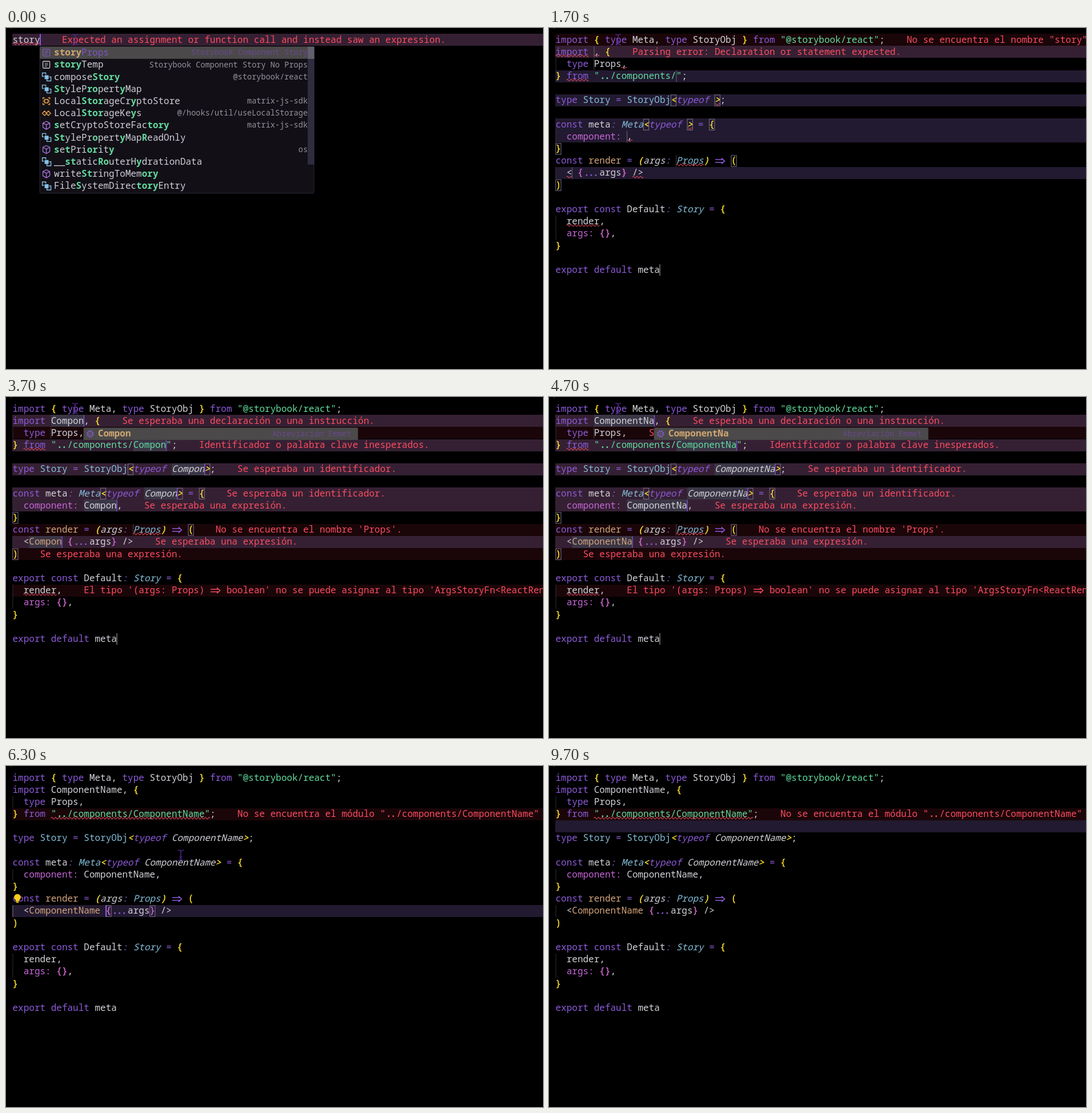
Write an HTML page that moves like this. It is 940x596 px and loops after 9.8 s.

```html
<!DOCTYPE html>
<html lang="es">
<head>
<meta charset="utf-8">
<title>Editor</title>
<style>
html, body { margin: 0; width: 100%; height: 100%; overflow: hidden; background: #000; }
svg { display: block; width: 940px; height: 596px; }
text { font-family: "Noto Sans Mono", "DejaVu Sans Mono", monospace; white-space: pre; }
</style>
</head>
<body>
<svg id="stage" viewBox="0 0 940 596"></svg>
<script>
const LOOP = 9800, CW = 9.6, LH = 21.18, FS = 16;
const X = c => 11.5 + c * CW;
const Y = l => 10 + l * LH;
const INK = { k: '#8d5bda', w: '#d3d2d9', g: '#ffe02e', s: '#62dd9f', c: '#83bcd8',
  o: '#d3a47c', p: '#c666d8', h: '#d468d2', r: '#fc4c60' };
const FULL = 'ComponentName';
const T = { insert: 1200, lint: 1500, check: 2100, close: 5200, clean: 5400, click: 5900,
  pick: 7700, bulb: 8200, leave: 8900, gone: 9400 };
const MOUSE = [[0, 121, 20], [5400, 121, 20], [5900, 172, 252], [6300, 306, 156],
  [7100, 306, 156], [7600, 243, 226], [8400, 243, 226], [8900, 400, 106], [9800, 400, 106]];

const esc = s => s.replace(/&/g, '&amp;').replace(/</g, '&lt;').replace(/>/g, '&gt;');
const rect = (x, y, w, h, fill, more = '') =>
  `<rect x="${x}" y="${y}" width="${w}" height="${h}" fill="${fill}" ${more}/>`;
const path = (d, stroke, w = 1.3, fill = 'none') =>
  `<path d="${d}" stroke="${stroke}" stroke-width="${w}" fill="${fill}"/>`;
const label = (x, y, s, fill, more = '', size = FS) =>
  `<text x="${x.toFixed(2)}" y="${y.toFixed(2)}" font-size="${size}" fill="${fill}" ${more}>${esc(s)}</text>`;

function arrow(x, y, ink) {
  return path(`M${x + 1} ${y - 2.3}h14M${x + 1} ${y + 2.3}h14M${x + 12} ${y - 5}l5.5 5l-5.5 5`, ink, 1.5);
}

// Joined dots sit closer together than the grid
function dots(x, y, n, ink) {
  const mid = x + n * CW / 2;
  let out = '';
  for (let i = 0; i < n; i++) out += `<circle cx="${mid + (i - (n - 1) / 2) * 8}" cy="${y}" r="1.4" fill="${ink}"/>`;
  return out;
}

// Writes text on the character grid with its ligatures
function write(line, col, s, ink, more) {
  let out = '';
  for (const part of s.split(/(=>|\.{2,3})/)) {
    if (part === '=>') out += arrow(X(col), Y(line) + 10.6, ink);
    else if (part.startsWith('..')) out += dots(X(col), Y(line) + 14.2, part.length, ink);
    else if (part.trim()) out += label(X(col), Y(line) + 15.5, part, ink, more);
    col += part.length;
  }
  return out;
}

// Colour key and text alternate; a capital key means italic
function source(n) {
  return [
    'k|import |g|{ |k|type |w|Meta, |k|type |w|StoryObj |g|} |k|from |s|"@storybook/react"|w|;',
    `k|import |w|${n}, |g|{`,
    'k|  type |w|Props,',
    `g|} |k|from |s|"../components/${n}"|w|;`,
    '',
    `k|type |c|Story |k|= |c|StoryObj|G|<|K|typeof |W|${n}|G|>|w|;`,
    '',
    `k|const |w|meta|K|: |C|Meta|G|<|K|typeof |W|${n}|G|> |k|= |g|{`,
    `p|  component: |w|${n},`,
    'g|}',
    'k|const |o|render |k|= |G|(|W|args|K|: |C|Props|G|) |k|=> |g|(',
    `w|  <|o|${n}|h| {|k|...|w|args|h|}|w| />`,
    'g|)',
    '',
    'k|export const |w|Default|K|: |C|Story |k|= |g|{',
    'w|  render,',
    'p|  args: |h|{}|w|,',
    'g|}',
    '',
    'k|export default |w|meta'
  ].map(l => l ? l.split('|') : []);
}
const width = toks => toks.reduce((sum, s, i) => sum + (i % 2 ? s.length : 0), 0);

function codeLine(toks, line) {
  let col = 0, out = '';
  for (let i = 0; i < toks.length; i += 2) {
    const key = toks[i], low = key.toLowerCase(), ink = INK[low];
    const slant = key === low ? '' : 'font-style="italic"';
    const heavy = 'gh'.includes(low) ? ` stroke="${ink}" stroke-width=".4"` : '';
    out += write(line, col, toks[i + 1], ink, slant + heavy);
    col += toks[i + 1].length;
  }
  return out;
}

function squiggle(line, col, n) {
  const x = X(col), steps = Math.round(n * CW / 3.2);
  let d = `M${x} ${Y(line) + 17.6}`;
  for (let i = 0; i < steps; i++) d += `q1.6 ${i % 2 ? 3 : -3} 3.2 0`;
  return path(d, '#d9485a', 1.1);
}
const band = (line, fill) => rect(11, Math.round(Y(line)), 929, 21, fill);
const mark = (line, col, n, fill) => rect(X(col), Math.round(Y(line)), n * CW, 21, fill);
const caret = (line, col, fill, w = 1.5) => rect(X(col) - .5, Y(line) + .5, w, LH - 1, fill);
const frame = (line, col) => rect(X(col) + .3, Y(line) + 1, CW - .4, LH - 2, 'none',
  'stroke="#77708a" stroke-width="1"');

function bulb(x, y) {
  return `<circle cx="${x}" cy="${y - 2}" r="5.8" fill="#ffcc1c"/>` +
    rect(x - 2.8, y + 2, 5.6, 3.2, '#ffcc1c') + rect(x - 2.3, y + 5.8, 4.6, 1.7, '#ffcc1c');
}

const ICON = {
  s: (x, y, ink) => rect(x - 6, y - 6, 12, 12, 'none', `rx="1.5" stroke="${ink}" stroke-width="1.3"`) +
    path(`M${x - 3} ${y - 2.5}h6M${x - 3} ${y + .3}h6M${x - 3} ${y + 3}h4`, ink, 1.1),
  v: (x, y) => rect(x - 3, y - 3, 7, 7, '#86bfe6', 'rx="1"') +
    path(`M${x - 4} ${y - 1}h-3v-6h6v3M${x + 5} ${y}h3v7h-7v-3`, '#86bfe6', 1.4),
  c: (x, y) => rect(x - 3, y - 3, 6, 6, 'none', 'stroke="#e09a48" stroke-width="1.6"') +
    path(`M${x - 6} ${y - 3}v-3h3M${x + 3} ${y - 6}h3v3M${x + 6} ${y + 3}v3h-3M${x - 3} ${y + 6}h-3v-3M${x - 6} ${y}h3M${x + 3} ${y}h3`, '#e09a48', 1.4),
  e: (x, y) => path(`M${x - 7} ${y}l4 -4l3.5 4l-3.5 4zM${x} ${y}l3.5 -4l4 4l-4 4z`, '#e09a48', 1.5),
  m: (x, y) => path(`M${x} ${y - 7}l6 3v7.5l-6 3.5l-6 -3.5v-7.5zM${x - 6} ${y - 4}l6 3l6 -3M${x} ${y - 1}v8`, '#a874dc'),
  g: (x, y, ink) => `<circle cx="${x}" cy="${y}" r="5.2" fill="none" stroke="${ink}" stroke-width="2.6" stroke-dasharray="2.3 1.78"/>` +
    `<circle cx="${x}" cy="${y}" r="3.9" fill="none" stroke="${ink}" stroke-width="1.2"/><circle cx="${x}" cy="${y}" r="1.3" fill="${ink}"/>`
};

// Items are "icon name|detail"; brackets hold the matched letters
const STORY = ['s [story]Props|Storybook Component Story', 's [story]Temp|Storybook Component Story No Props',
  'v compose[Story]|@storybook/react', 'v [St]yleP[ro]pert[y]Map', 'c Local[Stor]ageCr[y]ptoStore|matrix-js-sdk',
  'e Local[Stor]ageKe[y]s|@/hooks/util/useLocalStorage', 'm [s]etCryptoStoreFac[tory]|matrix-js-sdk',
  'v [St]ylePr[o]pert[y]Map[R]eadOnly', 'm [s]e[t]Pri[or]it[y]|os', 'v __[st]atic[Ro]uterH[y]drationData',
  'm write[St]ringToMem[ory]', 'v File[S]ystemDirec[tory]Entry'];
const WORDS = ['g Code', 'g Col', 'g Colg', 'g Colgroup', 'g Command', 's comp|React Functional Component',
  's compProps|React Functional Component with Props', 's con|constructor', 's useContextSnippet|useContext',
  's [cco]|consoleCount', 's [cco]|consoleCount'];

function matches(q) {
  const re = new RegExp(q, 'i');
  const rest = WORDS.filter(w => re.test(w.slice(2).split('|')[0]))
    .map(w => w.includes('[') ? w : w.slice(0, 2) + w.slice(2).replace(re, '[$&]'));
  return [`g [${q}]|Abreviación Emmet`, ...rest];
}

function popup(col, line, items) {
  const x = X(col) - .4, y = Y(line + 1) + 1.5, h = items.length * LH + (items.length > 1 ? 2 : 0);
  let out = rect(x, y, 480, h, '#121016', 'rx="2" stroke="#2d2936" stroke-width="1"') +
    rect(x, y, 480, LH, '#4b4949');
  if (items.length > 11) out += rect(x + 469, y, 11.5, 206, '#302c40') + rect(x + 469, y, 11.5, LH, '#625f6c');
  items.forEach((item, i) => {
    const cy = y + 10.4 + i * LH, [name, detail] = item.slice(2).split('|');
    out += ICON[item[0]](x + 11.5, cy, i ? '#c9c7d0' : '#7d58b8');
    let tx = x + 25;
    name.split(/[\[\]]/).forEach((s, j) => {
      const hit = j % 2;
      if (s) out += label(tx, cy + 5.2, s, hit ? (i ? '#62d9a0' : '#cfa672') : (i ? '#cfcdd6' : '#7d55c4'),
        hit ? 'font-weight="700"' : '');
      tx += s.length * CW;
    });
    if (detail) out += label(x + 469, cy + 4.3, detail, i ? '#94929b' : '#68498f', 'text-anchor="end"', 13.6);
  });
  return out;
}

// Letters typed so far
const typed = t => t < 2464 ? 0 : Math.min(FULL.length, 1 + Math.floor((t - 2464) / 208));

function problems(t) {
  if (t < T.lint) return { 0: 'No se encuentra el nombre "story".' };
  if (t < T.check) return { 0: 'No se encuentra el nombre "story".', 1: 'Parsing error: Declaration or statement expected.' };
  if (t >= T.clean) return { 3: `No se encuentra el módulo "../components/${FULL}"` };
  const decl = 'Se esperaba una declaración o una instrucción.', expr = 'Se esperaba una expresión.',
    id = 'Se esperaba un identificador.';
  return { 1: decl, 2: decl, 3: 'Identificador o palabra clave inesperados.', 5: id, 7: id, 8: expr,
    10: "No se encuentra el nombre 'Props'.", 11: expr, 12: expr,
    15: "El tipo '(args: Props) => boolean' no se puede asignar al tipo 'ArgsStoryFn<ReactRenderer, Props>'." };
}

function underlines(t, n) {
  if (t < T.lint) return [];
  if (t >= T.clean) return [[3, 7, 29]];
  const list = [[3, 2, 4], [10, 22, 5], [15, 2, 6]];
  if (n < 6) list.push([1, 0, 6], [1, 7 + n, 1], [11, 2, 1]);
  if (!n) list.push([2, 12, 1], [5, 29, 1], [7, 24, 1], [8, 13, 1], [11, 14, 2]);
  return list;
}

function pointer(t) {
  if (t >= T.gone) return '';
  const i = MOUSE.findIndex(m => m[0] > t), [t0, x0, y0] = MOUSE[i - 1], [t1, x1, y1] = MOUSE[i];
  const u = (t - t0) / (t1 - t0), e = u * u * (3 - 2 * u);
  const x = x0 + (x1 - x0) * e, y = y0 + (y1 - y0) * e;
  return path(`M${x - 5} ${y - 9}q5 0 5 3q0 -3 5 -3M${x} ${y - 7}v14M${x - 5} ${y + 9}q5 0 5 -3q0 3 5 3M${x - 2.5} ${y + 3}h5`, '#4c2384', 1.7);
}

const blink = (t, from) => Math.floor((t - from) / 500) % 2 === 0;

function opening(t) {
  return band(0, '#352033') + write(0, 0, 'story', INK.w) + squiggle(0, 0, 5) +
    write(0, 9, 'Expected an assignment or function call and instead saw an expression.', INK.r) +
    (blink(t, 0) ? caret(0, 5, '#8358e0', 2) : '') + popup(5, 0, STORY);
}

function editor(t) {
  const n = typed(t), lines = source(FULL.slice(0, n)), errs = problems(t);
  const fields = [[1, 7], [3, 22], [5, 29], [7, 24], [8, 13], [11, 3]];
  const live = t < T.click;
  const current = live ? fields.map(f => f[0]) : t < T.pick ? [11] : t < T.leave ? [] : [4];
  let out = '';
  lines.forEach((_, i) => {
    const on = current.includes(i);
    if (on || errs[i]) out += band(i, on ? (errs[i] ? '#352033' : '#221a30') : '#1a0609');
  });
  for (const l of [2, 8, 11, 15, 16])
    out += rect(11.5, Y(l), 1, LH, l === 11 && !live && t < T.leave ? '#77747e' : '#2d2a34');
  if (live) {
    for (const [l, c] of fields) out += mark(l, c, n, '#3b3646');
    for (const [l, c] of [[2, 7], [10, 22]]) out += caret(l, c, '#45414e', 1);
  }
  if (t >= T.pick && t < T.leave) out += mark(2, 7, 5, '#332d42') + mark(10, 22, 5, '#322b4a');
  lines.forEach((toks, i) => {
    out += codeLine(toks, i);
    if (errs[i]) out += write(i, width(toks) + 4, errs[i], INK.r);
  });
  for (const u of underlines(t, n)) out += squiggle(...u);
  if (live) {
    for (const b of [[5, 21], [5, 29 + n], [7, 16], [7, 24 + n], [7, 28 + n], [9, 0], [10, 32], [12, 0]]) out += frame(...b);
    for (const [l, c] of fields) out += caret(l, c + n, n ? '#7350c4' : '#55505f');
    out += caret(19, 19, '#8b8992', 1.3);
  } else if (t < T.pick) {
    out += frame(11, 17) + frame(11, 25);
    if (blink(t, T.click)) out += caret(11, 17, '#8a63e0', 2);
    if (t >= 6100) out += bulb(20, 231.5);
  } else if (t < T.leave) {
    if (t >= T.bulb) out += bulb(30, 210.5);
  } else if (blink(t, T.leave)) out += caret(4, 0, '#8a63e0', 2);
  const seen = typed(t - 100);
  if (seen && t < T.close) out += popup(7 + seen, 1, matches(FULL.slice(0, seen)));
  return out;
}

const stage = document.getElementById('stage');
let shown = -1;
function draw(now) {
  const t = Math.floor(now % LOOP / 100) * 100;
  if (t !== shown) {
    shown = t;
    stage.innerHTML = rect(0, 0, 940, 596, '#000') + rect(8, 0, 2, 1, '#70352c') +
      (t < T.insert ? opening(t) : editor(t)) + pointer(t);
  }
}
const start = performance.now();
function tick() {
  draw(performance.now() - start);
  requestAnimationFrame(tick);
}
tick();
</script>
</body>
</html>
```
